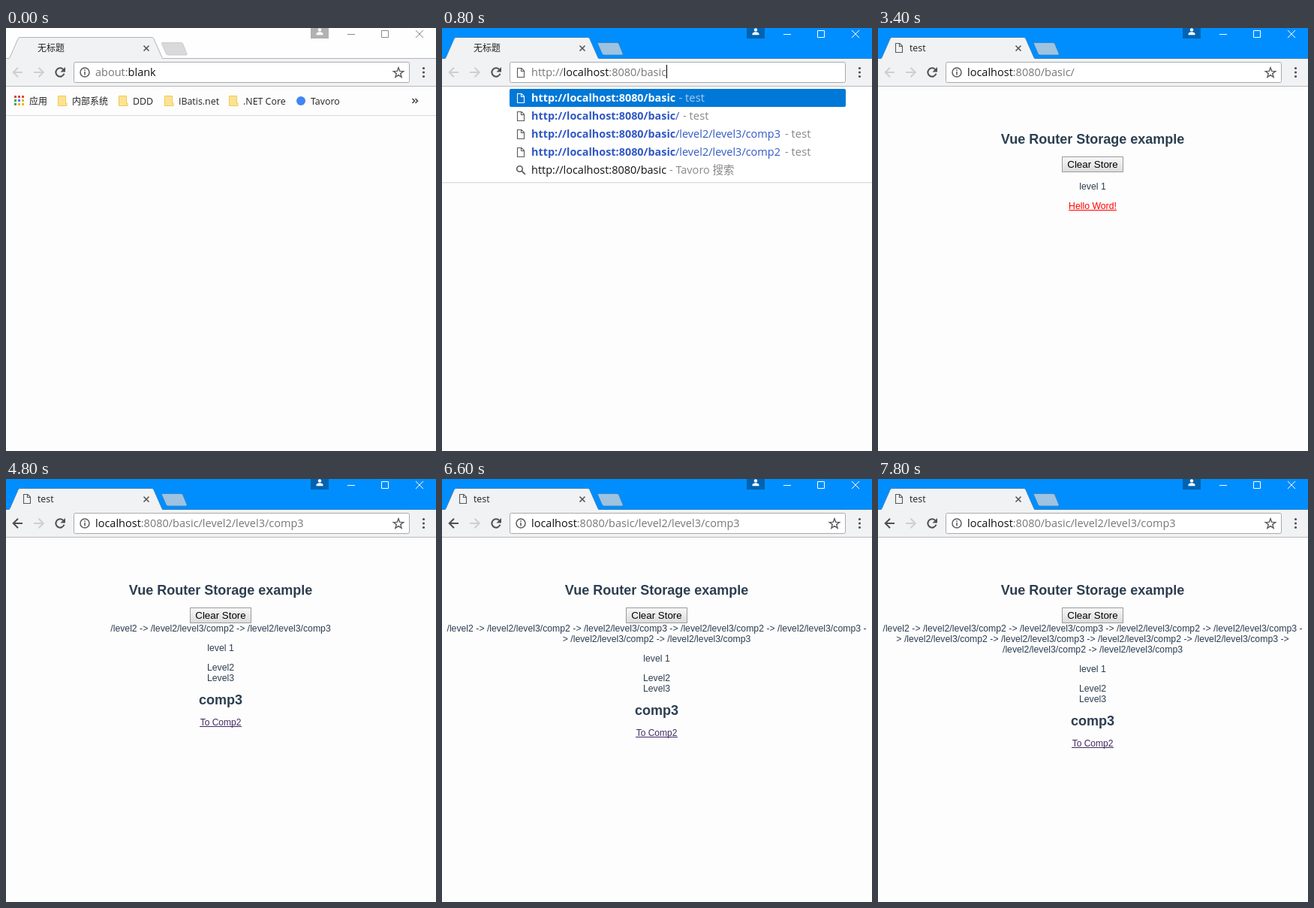
An HTML page for the animation above (8000 ms loop, 573 by 563 pixels).

```html
<!DOCTYPE html>
<html lang="zh">
<head>
<meta charset="utf-8">
<title>Browser demo</title>
<style>
html, body { margin: 0; width: 100%; height: 100%; overflow: hidden; background: #fdfdfd; }
svg { display: block; }
text { white-space: pre; }
.ui { font-family: "Open Sans", "Noto Sans CJK SC", "Noto Sans CJK", sans-serif; }
.page { font-family: "Liberation Sans", Arial, sans-serif; text-anchor: middle; fill: #2c3e50; }
</style>
</head>
<body>
<svg id="stage" width="573" height="563" viewBox="0 0 573 563"></svg>
<script>
const stage = document.getElementById('stage');
const LOOP = 8000;

// [start ms, phase, visits, link pressed]
const steps = [
  [0, 'idle'], [500, 'active'], [600, 'select'], [800, 'typed'], [1300, 'blink'], [1600, 'load'],
  [1800, 'page', 0], [3400, 'page', 0, 1], [3500, 'page', 1], [4200, 'page', 1, 1],
  [4300, 'page', 2], [4700, 'page', 2, 1], [4800, 'page', 3], [5100, 'page', 4],
  [5300, 'page', 4, 1], [5400, 'page', 5], [5600, 'page', 6], [6000, 'page', 6, 1],
  [6500, 'page', 7, 1], [6600, 'page', 7], [6800, 'page', 8], [7000, 'page', 8, 1],
  [7100, 'page', 9], [7200, 'page', 9, 1], [7300, 'page', 10], [7500, 'page', 10, 1],
  [7800, 'page', 11]
];

const rect = (x, y, w, h, fill, more = '') =>
  `<rect x="${x}" y="${y}" width="${w}" height="${h}" fill="${fill}" ${more}/>`;
const line = (d, color, w = 1) =>
  `<path d="${d}" fill="none" stroke="${color}" stroke-width="${w}"/>`;
const dot = (x, y, r, fill) => `<circle cx="${x}" cy="${y}" r="${r}" fill="${fill}"/>`;
const ui = (x, y, size, fill, s, more = '') =>
  `<text class="ui" x="${x}" y="${y}" font-size="${size}" fill="${fill}" ${more}>${s}</text>`;
const span = (fill, s) => `<tspan fill="${fill}">${s}</tspan>`;
const esc = s => s.replace(/>/g, '&gt;');
const body = (y, s) => `<text class="page" x="286" y="${y}" font-size="12.25">${esc(s)}</text>`;
const heading = (y, s) =>
  `<text class="page" x="286" y="${y}" font-size="18" font-weight="bold">${s}</text>`;

function link(y, s, half, size, color) {
  return `<text class="page" x="286" y="${y}" font-size="${size}" style="fill:${color}">${s}</text>` +
    rect(286 - half, y + 1, half * 2, 1, color);
}

function fileIcon(x, y, color = '#5a5a5a') {
  return line(`M${x + .5} ${y + .5}h5.5l3.5 3.5v8.5h-9zM${x + 5.5} ${y + .5}v4h4`, color, 1.1);
}

function infoIcon() {
  return `<circle cx="105" cy="59" r="6" fill="none" stroke="#5a5a5a" stroke-width="1.5"/>` +
    rect(104.2, 58, 1.6, 4.5, '#5a5a5a') + rect(104.2, 55.3, 1.6, 1.6, '#5a5a5a');
}

function star() {
  let d = '';
  for (let i = 0; i < 10; i++) {
    const r = i % 2 ? 2.9 : 7, a = i * Math.PI / 5;
    d += `${i ? 'L' : 'M'}${(523 + r * Math.sin(a)).toFixed(2)} ${(59.7 - r * Math.cos(a)).toFixed(2)}`;
  }
  return line(d + 'Z', '#5a5a5a', 1.4);
}

function titleBar(on, phase) {
  const ink = on ? '#fff' : '#8a8a8a';
  let out = rect(0, 0, 573, 41, on ? '#008eff' : '#fefefe');
  out += rect(406, 0, 24, 14, on ? '#0063b1' : '#b1b1b1') + dot(418, 2.4, 2.2, '#fff') +
    '<path d="M413.5 9.2V8c0-2 3-2.8 4.5-2.8s4.5.8 4.5 2.8v1.2z" fill="#fff"/>';
  out += line('M455 8.5h10M500.5 3.5h9v9h-9zM546 3l10 10M556 3l-10 10', ink);
  out += `<path d="M208.5 19.5H233q2 0 2.7 1.6L241 34q.8 2-1 2h-24q-2 0-2.8-2L207.500 21q-.5-1.500 1-1.500z"
    fill="${on ? '#9dc3e0' : '#d9d9d9'}" stroke="${on ? '#2f7fbf' : '#c6c6c6'}" stroke-width=".8"/>`;
  out += rect(0, 40, 573, 38, '#f1f2f3');
  out += line('M0 40.5H573', on ? '#2a80c4' : '#b3b5b8');
  out += '<path d="M3 41.5Q4.500 41 5 39.500L16 14.500Q16.800 12.500 18.500 12.500H194.500' +
    `Q196.200 12.500 197 14.500L208 39.500Q208.500 41 210 41.500z" fill="#f1f2f3"/>`;
  out += line('M3.500 40.500Q4.600 40.300 5 39.500L16 14.500Q16.800 12.500 18.500 12.500H194.500' +
    'Q196.200 12.500 197 14.500L208 39.500Q208.400 40.300 209.500 40.500', on ? '#2a80c4' : '#a9abae', .9);
  out += line('M183.500 23.500l7 7M190.500 23.500l-7 7', '#5a5a5a', 1.7);
  if (phase === 'page') {
    out += fileIcon(23, 20) + ui(42, 31, 12.4, '#222', 'test');
  } else if (phase === 'load') {
    out += line('M28 21a6 6 0 1 0 6 6', '#7a7a7a', 1.8) + ui(42, 31, 12.4, '#222', 'localhost:8080/basic');
  } else {
    out += ui(42, 31, 12, '#222', '无标题');
  }
  return out;
}

function address(phase, visits) {
  const gray = '#777', dark = '#111';
  const url = s => ui(119, 64, 14.5, gray, s);
  if (phase === 'idle' || phase === 'active') return url('about:' + span(dark, 'blank'));
  if (phase === 'select') return rect(119, 49, 81, 18, '#0078d7') + url(span('#fff', 'about:blank'));
  const host = span(dark, 'localhost') + ':8080/basic';
  if (phase === 'load') return url(host);
  if (phase === 'page') {
    const tail = visits ? '/level2' + (visits > 1 ? '/level3/' + comp(visits) : '') : '/';
    return url(host + tail);
  }
  return url('http://' + host) + (phase === 'typed' ? rect(299, 49, 1, 18, '#000') : '');
}

function toolbar(phase, visits) {
  const typing = phase === 'typed' || phase === 'blink';
  let out = line('M22 59H10M16 52.700L9.700 59L16 65.300', visits ? '#505050' : '#cfcfcf', 2);
  out += line('M37 59H49M43.500 52.700L49.800 59L43.500 65.300', '#cfcfcf', 2);
  if (phase === 'load') {
    out += line('M67 54l10 10M77 54l-10 10', '#505050', 2);
  } else {
    out += line('M76.200 55A5.700 5.700 0 1 0 77.500 60.800', '#505050', 2) +
      '<path d="M79 52v6.500h-6.500z" fill="#505050"/>';
  }
  out += rect(90.5, 45.5, 447, 27, '#fff', 'rx="2" stroke="#a8aaaf"');
  out += typing || phase === 'load' ? fileIcon(100, 53) : infoIcon();
  if (!typing) out += star();
  for (const y of [53.5, 59, 64.5]) out += dot(556.5, y, 1.6, '#505050');
  return out + address(phase, visits) + line('M0 77.500H573', '#b9babc');
}

function bookmarks() {
  const hues = ['#e0453a', '#e0453a', '#e0453a', '#3aa757', '#4285f4', '#f2b51d', '#3aa757', '#f2b51d', '#f2b51d'];
  let out = line('M0 116.500H573', '#d9d9d9');
  hues.forEach((c, i) => out += rect(11 + i % 3 * 5, 90 + (i / 3 | 0) * 5, 3, 3, c));
  for (const x of [69, 150, 211, 297]) {
    out += `<path d="M${x + .5} 90.500h10v9.500h1.500v3.500h-11.500z" fill="#fde293" stroke="#efc95a"/>`;
  }
  out += dot(393, 97, 6, '#4285f4');
  const label = (x, s, size = 12.4) => ui(x, 102, size, '#222', s);
  out += label(31, '应用', 12) + label(88, '内部系统', 12) + label(169, 'DDD') +
    label(230, 'IBatis.net') + label(316, '.NET Core') + label(406, 'Tavoro');
  return out + line('M541.500 94l3 3l-3 3M545.500 94l3 3l-3 3', '#444', 1.6);
}

function suggestions() {
  const base = 'http://localhost:8080/basic', deep = '/level2/level3/comp';
  const rows = [['', 315.5], ['/', 321], [deep + 3, 457], [deep + 2, 457]];
  let out = rect(0, 78, 573, 128, '#fff') + rect(90, 81, 448, 24, '#0078d7', 'rx="2"');
  rows.forEach(([tail, x], i) => {
    const y = 98 + i * 24, ink = i ? '#3159c4' : '#fff';
    out += fileIcon(100, y - 11, i ? '#5a5a5a' : '#fff') +
      ui(119, y, 14.4, ink, base, 'font-weight="bold"') +
      ui(311, y, 14.5, ink, tail) + ui(x, y, 14.8, i ? '#888' : '#a5cdf0', '- test');
  });
  out += `<circle cx="103.500" cy="187.500" r="3.800" fill="none" stroke="#5a5a5a" stroke-width="1.600"/>` +
    line('M106.300 190.300l4.500 4.500', '#5a5a5a', 1.8);
  out += ui(119, 194, 14.5, '#111', base) + ui(303, 194, 14.5, '#888', '- Tavoro 搜索');
  return out + line('M0 205.500H573', '#dcdcdc') + line('M0 206.500H573', '#f0f0f0');
}

const comp = n => 'comp' + (n % 2 ? 3 : 2);

// The trail breaks after five entries, then after four more.
function trail(n) {
  const all = Array.from({ length: n }, (_, i) => i ? '/level2/level3/' + comp(i + 1) : '/level2');
  const join = (a, b) => all.slice(a, b).join(' -> ');
  const lines = [];
  if (n) lines.push(join(0, 5) + (n > 5 ? ' -' : ''));
  if (n > 5) lines.push('> ' + join(5, 9) + (n > 9 ? ' ->' : ''));
  if (n > 9) lines.push(join(9));
  return lines;
}

function page(n, pressed) {
  const lines = trail(n), dy = lines.length * 14;
  const ink = pressed ? '#f00' : n ? '#432a63' : '#551a8b';
  let out = heading(154, 'Vue Router Storage example');
  out += rect(245.5, 171.5, 81, 20, 'url(#btn)', 'stroke="#9b9b9b"') +
    '<text class="page" x="286" y="186" font-size="13.330" style="fill:#000">Clear Store</text>';
  lines.forEach((s, i) => out += body(203 + i * 14, s));
  out += body(215 + dy, 'level 1');
  if (!n) return out + link(241, 'Hello Word!', 32, 12.25, ink);
  out += body(241 + dy, 'Level2');
  const deep = n > 1 ? 14 : 0;
  if (deep) out += body(255 + dy, 'Level3');
  out += heading(272 + dy + deep, n > 1 ? comp(n) : 'comp1');
  return out + link(300 + dy + deep, 'To Comp' + (n > 1 && n % 2 === 0 ? 3 : 2), 28, 12, ink);
}

const defs = '<defs><linearGradient id="btn" x1="0" y1="0" x2="0" y2="1">' +
  '<stop offset="0" stop-color="#f8f8f8"/><stop offset="1" stop-color="#dcdcdc"/></linearGradient></defs>';

function draw([, phase, visits = 0, pressed = 0]) {
  let out = defs + rect(0, 0, 573, 563, '#fdfdfd') + titleBar(phase !== 'idle', phase) + toolbar(phase, visits);
  if (phase === 'page') out += page(visits, pressed);
  else if (phase === 'typed' || phase === 'blink') out += suggestions();
  else out += bookmarks();
  stage.innerHTML = out;
}

let shown = null;
const start = performance.now();
function tick() {
  const t = (performance.now() - start) % LOOP;
  const step = steps.filter(s => s[0] <= t).pop();
  if (step !== shown) draw(shown = step);
  requestAnimationFrame(tick);
}
tick();
</script>
</body>
</html>
```
